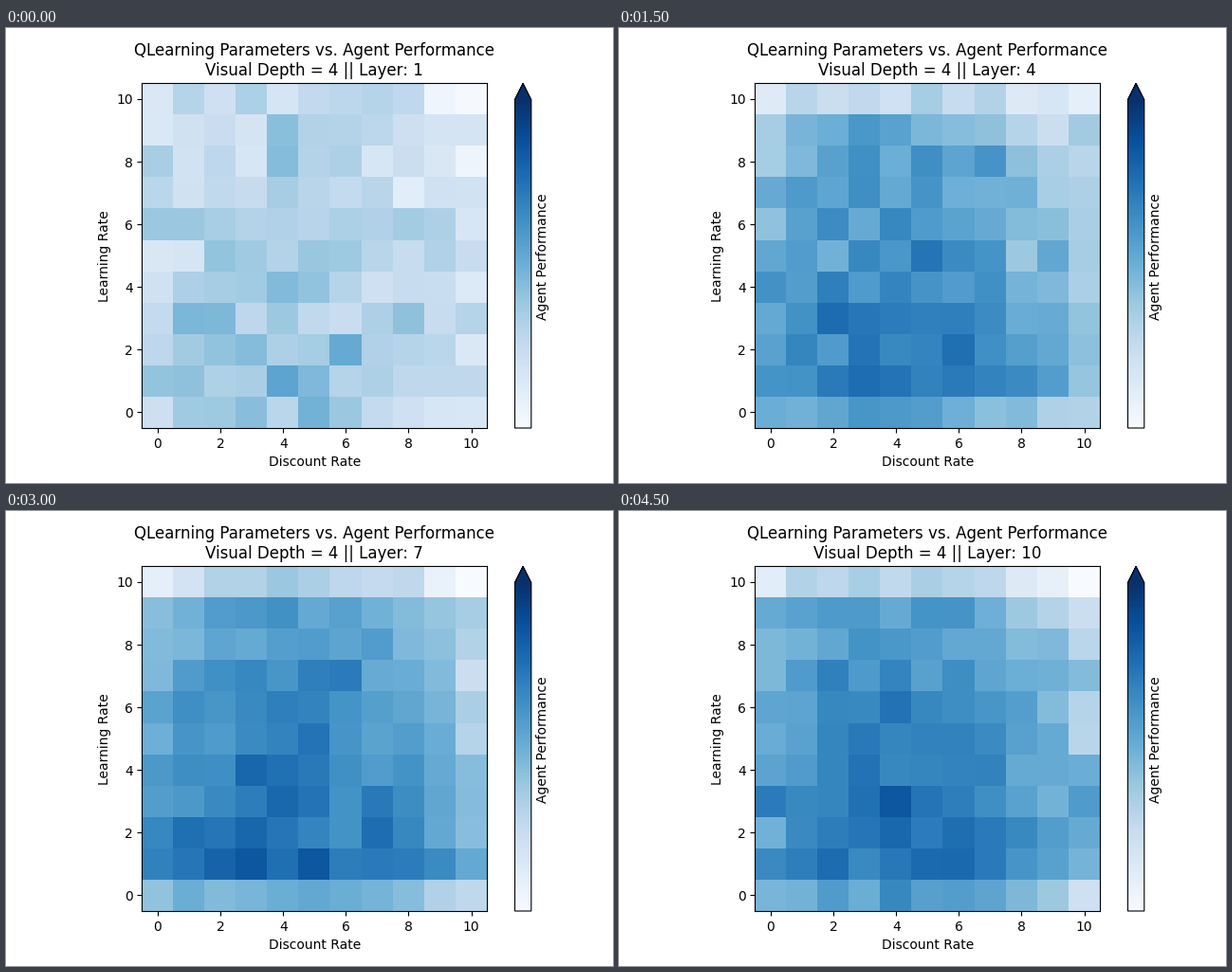
Animation, 640 px wide and 480 px high, one loop 5 s. Source, as a matplotlib script:

```python
import numpy as np
import matplotlib.pyplot as plt
from matplotlib.animation import FuncAnimation

W, H, DPI = 640, 480, 100
LAYERS = 10
SIDE = 363.6
BOTTOM = 58.0


def performance(layer):
    """Performance on the 11 x 11 grid; it grows and levels off with depth."""
    rate, disc = np.mgrid[0:11, 0:11]
    grow = 1 - np.exp(-(layer - 1) / 1.7)
    early = .34 - .008 * rate
    late = .74 - .028 * rate
    edge = .06 + .19 * grow
    ridge = (.6 + .4 * grow) * (.09 - .0085 * (disc - 4) ** 2)

    grid = early + (late - early) * grow + ridge
    grid[10] -= edge
    grid[0] -= .25 * grow
    rng = np.random.default_rng(40 + layer)
    grid += rng.normal(0, .08 - .03 * grow, grid.shape)
    return np.clip(grid, 0, .85)


def add_box(x, width):
    return fig.add_axes([x / W, BOTTOM / H, width / W, SIDE / H])


plt.rcParams["font.family"] = "DejaVu Sans"
fig = plt.figure(figsize=(W / DPI, H / DPI), dpi=DPI, facecolor="white")

ax = add_box(143.45, SIDE)
image = ax.imshow(performance(1), cmap="Blues", vmin=0, vmax=1,
                  origin="lower", aspect="auto", interpolation="nearest")
ax.set_xticks(range(0, 11, 2))
ax.set_yticks(range(0, 11, 2))
ax.set_xlabel("Discount Rate")
ax.set_ylabel("Learning Rate")

bar = fig.colorbar(image, cax=add_box(536.5, 17.3), extend="max")
bar.set_ticks([])
fig.text(566 / W, 239.2 / H, "Agent Performance", rotation=90,
         ha="center", va="center")


def draw(frame):
    layer = frame % LAYERS + 1
    image.set_data(performance(layer))
    title = ax.set_title("QLearning Parameters vs. Agent Performance\n"
                         f"Visual Depth = 4 || Layer: {layer}")
    return image, title


anim = FuncAnimation(fig, draw, frames=LAYERS, interval=500,
                     init_func=lambda: draw(0), repeat=True, repeat_delay=0)
plt.show()
```
